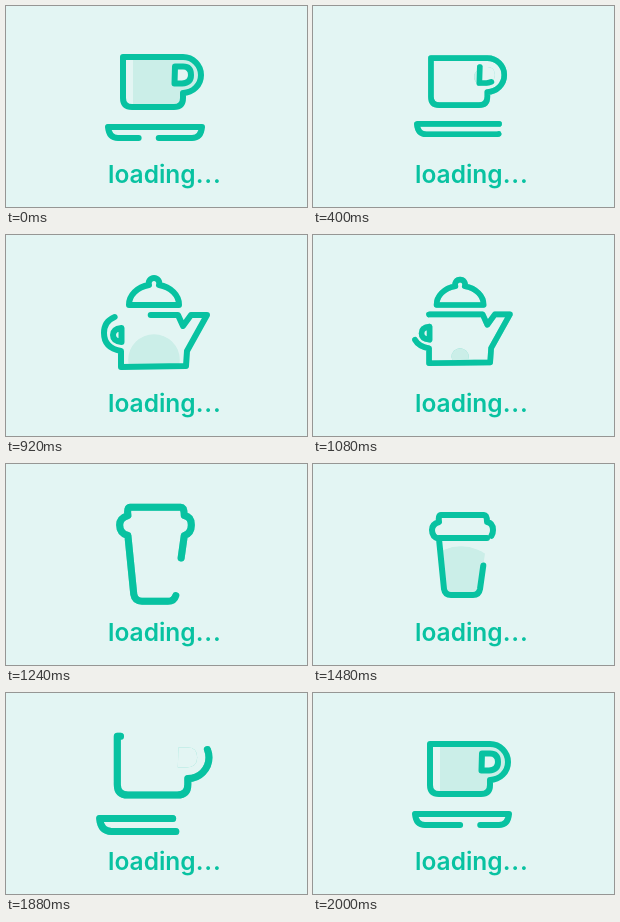
Animation, 301 px wide and 201 px high, one loop 2040 ms. Source, as an HTML page:

```html
<!DOCTYPE html>
<html lang="en">
<head>
<meta charset="utf-8">
<title>Loading</title>
<style>
  html, body { margin: 0; width: 100%; height: 100%; overflow: hidden; background: #e3f5f3; }
  svg { display: block; width: 301px; height: 201px; }
  .line { fill: none; stroke: #08c2a1; stroke-width: 6; stroke-linecap: round; stroke-linejoin: round; }
  .fill { fill: #cbeee8; }
  .hole { fill: #e3f5f3; }
  text { font: 600 24.5px Inter, Roboto, sans-serif; fill: #08c2a1; }
  .dots { letter-spacing: .8px; }
</style>
</head>
<body>
<svg viewBox="0 0 301 201">
  <defs><clipPath id="pool"><circle/></clipPath></defs>
  <g id="stage"></g>
  <text x="102" y="177">loading<tspan class="dots">...</tspan></text>
</svg>
<script>
const LOOP = 2040, FRAME = 40, STEP = LOOP / 3, LEAD = 240;
const CX = 149.5, CY = 95;

const potLid = "M123 70A25 20 0 0 1 143 50A5.3 5.3 0 1 1 153 50A25 20 0 0 1 173 70Z";
const potBody = "M116 80H172L177 91L185 80H201L181 116L180 131L115 132V116";

// Outlines carry a travelling gap: mid (% of the path), turn (% per ms), size (%).
// Inner lines appear with the fill and later open around mid by `open` %.
const icons = [
  {
    pool: [172, 71],
    fills: ["M127 51H177A18 18 0 0 1 177 87V92Q177 101 168 101H127Z"],
    lines: [
      { d: "M117 51H177A18 18 0 0 1 177 87V92Q177 101 168 101H126Q117 101 117 92Z", mid: 18 },
      { d: "M169 60.5L168.5 77.5H176Q185 77 185 69Q185 60.5 177 60.5Z", mid: 75, open: 50, hole: true },
      { d: "M102 121H196Q195 132 186 132H112Q103 132 102 121Z", mid: 76.5, turn: .18, size: 10 }
    ]
  },
  {
    pool: [148, 125],
    fills: [potLid, potBody],
    lines: [
      { d: potLid, mid: 25 },
      { d: potBody + "Q98 113 98 98Q98 83 116 80Z", mid: 19, turn: -.064, size: 12.5 },
      { d: "M115.5 93V107Q107 106 107 100Q107 94 115.5 93Z", mid: 50, open: 0, hole: true }
    ]
  },
  {
    pool: [148, 126],
    fills: ["M126 75H174L167 125Q166 131 160 131H138Q132 131 131 125Z"],
    lines: [
      { d: "M128 51H171Q174 51 174 58Q180 59 180 66Q180 73 174 75L167 125Q166 131 160 131H138Q132 131 131 125L126 75Q119 73 119 66Q119 60 126 58Q125 51 128 51Z",
        mid: 39, turn: -.042, size: 13 },
      { d: "M126 74H174", mid: 85, open: 36 }
    ]
  }
];

const stage = document.getElementById("stage");
const pool = document.querySelector("#pool circle");

function set(el, attrs) {
  for (const key in attrs) el.setAttribute(key, attrs[key]);
}

function add(parent, tag, attrs) {
  const el = document.createElementNS("http://www.w3.org/2000/svg", tag);
  set(el, attrs);
  return parent.appendChild(el);
}

function ramp(ms, from, to) {
  return Math.min(1, Math.max(0, (ms - from) / (to - from)));
}

for (const icon of icons) {
  icon.el = add(stage, "g", {});
  icon.fillEl = add(icon.el, "g", { class: "fill", "clip-path": "url(#pool)" });
  for (const d of icon.fills) add(icon.fillEl, "path", { d });
  for (const line of icon.lines) {
    if (line.hole) add(icon.el, "path", { d: line.d, class: "hole" });
    line.el = add(icon.el, "path", { d: line.d, class: "line", pathLength: 100 });
  }
}

function gapSize({ size = 0, open }, ms) {
  if (open !== undefined) return 100 * (1 - ramp(ms, 120, 160)) + open * ramp(ms, 440, 640);
  const tracing = 1 - ramp(ms, 0, 120), closing = 1 - ramp(ms, 120, 160);
  return Math.max(size, 13 * closing) + 62 * tracing;
}

function drawLine(line, ms) {
  const size = gapSize(line, ms);
  const mid = line.mid + (line.turn || 0) * (ms - LEAD);
  set(line.el, {
    "stroke-dasharray": size < .1 ? "none" : `${100 - size} ${size}`,
    "stroke-dashoffset": -(mid + size / 2),
    visibility: size > 99 ? "hidden" : "visible"
  });
}

function draw(time) {
  const now = Math.floor((time + 4) / FRAME) * FRAME;
  const t = now % LOOP + LEAD;
  const ms = t % STEP;
  const icon = icons[Math.floor(t / STEP) % icons.length];

  // Each icon is traced large, settles to size, drains, then shrinks away.
  const settle = ramp(ms, 120, 200), exit = ramp(ms, 600, STEP);
  const level = 1 - ramp(ms, LEAD, STEP);
  const rush = 4 * settle * (1 - settle);
  const scale = 1 + .175 * (1 - settle ** 1.4) - .12 * exit;
  const blur = .3 * rush + .4 * (1 - settle) + exit;
  const glow = 2 * rush + .5 * (1 - settle) + exit;

  for (const other of icons) other.el.style.display = other === icon ? "" : "none";
  set(icon.el, {
    transform: `translate(${CX - 2 * exit} ${CY - 3 * exit}) scale(${scale}) translate(${-CX} ${-CY})`
  });
  icon.el.style.filter = glow > 0 ? `blur(${blur}px) drop-shadow(0 0 ${glow}px #08c2a180)` : "none";
  icon.fillEl.style.opacity = ramp(ms, 120, 160);
  set(pool, { cx: icon.pool[0], cy: icon.pool[1], r: 5 + 45 * level + 40 * level ** 6 });
  for (const line of icon.lines) drawLine(line, ms);
}

const begin = performance.now();
function tick() {
  draw(performance.now() - begin);
  requestAnimationFrame(tick);
}
tick();
</script>
</body>
</html>
```
